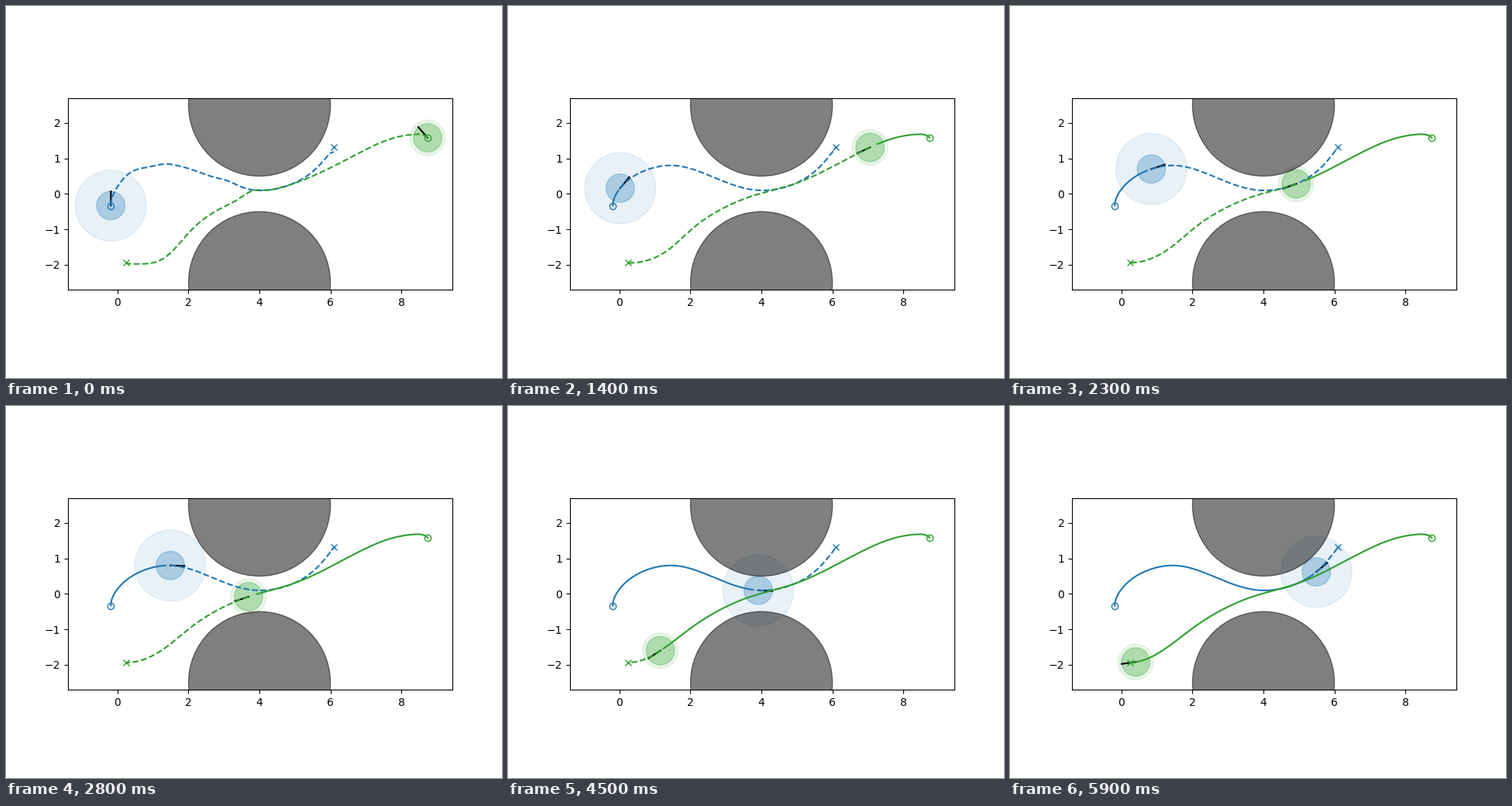
A matplotlib script for the animation above (6 s loop, 640 by 480 pixels).

```python
import numpy as np
import matplotlib.pyplot as plt
from matplotlib.animation import FuncAnimation
from matplotlib.patches import Circle

FRAMES, INTERVAL = 60, 100
TIMES = np.arange(FRAMES) * INTERVAL / 1000
BODY = 0.4


def spline(x, y, start_slope):
    """Cubic spline with a clamped start and a natural end."""
    n, h = len(x), np.diff(x)
    d = np.diff(y, axis=0) / h[:, None]
    a, b = np.zeros((n, n)), np.zeros_like(y)
    for i in range(1, n - 1):
        l, r = 1 / h[i - 1], 1 / h[i]
        a[i, i - 1:i + 2] = l, 2 * (l + r), r
        b[i] = 3 * (d[i - 1] * l + d[i] * r)
    a[0, 0], b[0] = 1, start_slope
    a[-1, -2:], b[-1] = (1, 2), 3 * d[-1]
    m = np.linalg.solve(a, b)

    def evaluate(q):
        q = np.asarray(q)
        i = np.clip(np.searchsorted(x, q, side="right") - 1, 0, n - 2)
        w = h[i][:, None]
        s = (q - x[i])[:, None] / w
        return (y[i] * (1 + 2 * s) * (1 - s) ** 2 + m[i] * w * s * (1 - s) ** 2
                + y[i + 1] * s * s * (3 - 2 * s) + m[i + 1] * w * s * s * (s - 1))

    return evaluate


class Agent:
    """Robot that drives through keys (time, x, y) and replans on the way.

    Its plan differs from the route by bumps (x, width, height, decay time).
    """

    def __init__(self, ax, color, reach, angle, keys, bumps):
        keys = np.array(keys)
        t, points = keys[:, 0], keys[:, 1:]
        u = np.r_[0, np.cumsum(np.hypot(*np.diff(points, axis=0).T))]
        a = np.radians(angle)
        self.path = spline(u, points, (np.cos(a), np.sin(a)))
        self.u = spline(t, u[:, None], 0)(TIMES)[:, 0]
        self.length, self.bumps = u[-1], bumps

        self.discs = [Circle(points[0], r, color=color, alpha=alpha)
                      for r, alpha in ((reach, 0.1), (BODY, 0.3))]
        for disc in self.discs:
            ax.add_patch(disc)
        self.nose, = ax.plot([], [], color="k")
        self.trail, = ax.plot([], [], color=color)
        self.plan, = ax.plot([], [], "--", color=color)
        ax.plot(*points[0], "o", color=color, fillstyle="none")
        ax.plot(*points[-1], "x", color=color)

    def planned(self, k):
        u = np.linspace(self.u[k], self.length, 200)
        x, y = self.path(u).T
        near = np.clip((u - u[0]) / 0.4, 0, 1)
        for center, width, height, decay in self.bumps:
            bump = height * np.exp(-((x - center) / width) ** 2)
            y = y + near * bump * np.exp(-TIMES[k] / decay)
        return x, y

    def show(self, k):
        here, ahead = self.path([self.u[k], self.u[k] + 0.01])
        for disc in self.discs:
            disc.center = tuple(here)
        step = (ahead - here) / np.hypot(*(ahead - here))
        self.nose.set_data(*np.array([here, here + BODY * step]).T)
        # the trail ends one step behind the robot
        done = np.linspace(0, self.u[k - 1], 200) if k else np.empty(0)
        self.trail.set_data(*self.path(done).T)
        self.plan.set_data(*self.planned(k))


fig, ax = plt.subplots(figsize=(6.4, 4.8), dpi=100)
ax.set_aspect("equal")

agents = [
    Agent(ax, "C0", 1.0, 90,
          [(0, -.19, -.33), (1.4, .02, .16), (2.3, .84, .70), (2.8, 1.49, .80),
           (3.7, 2.74, .43), (4.5, 3.91, .10), (5.9, 5.49, .62),
           (6.7, 6.1, 1.31)],
          [(.35, .45, .13, .4), (1.3, .4, .04, .4), (3.1, .4, .08, .4),
           (6.2, .15, -.2, .4)]),
    Agent(ax, "C2", 0.5, 130,
          [(0, 8.74, 1.58), (.7, 8.33, 1.675), (1.4, 7.06, 1.31),
           (2.3, 4.92, .28), (2.8, 3.69, -.08), (3.7, 2.03, -.95),
           (4.5, 1.15, -1.6), (5.9, .40, -1.92), (6.3, .25, -1.935)],
          [(6.5, 1, -.04, .4), (3.8, .35, .13, .4), (1.35, .7, -.32, 1.6)]),
]

for y in (2.5, -2.5):
    ax.add_patch(Circle((4, y), 2, color="k", alpha=0.5))
ax.set_xlim(-1.396, 9.438)
ax.set_ylim(-2.7, 2.7)


def draw(k):
    for agent in agents:
        agent.show(k)


anim = FuncAnimation(fig, draw, frames=FRAMES, interval=INTERVAL,
                     repeat=True, repeat_delay=0, blit=False)
plt.show()
```
